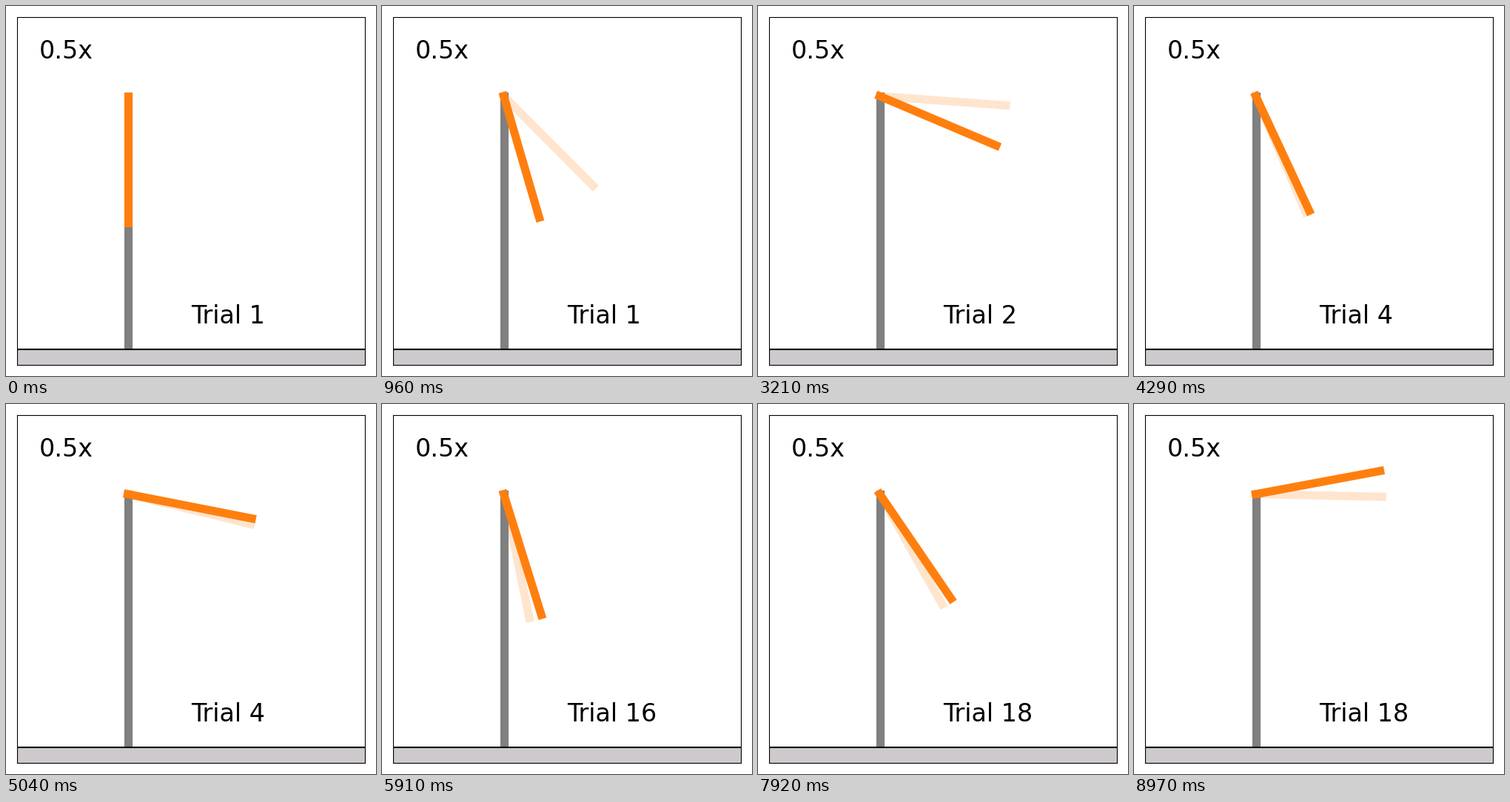
A matplotlib script for the animation above (9000 ms loop, 500 px wide and 500 px high).

```python
import matplotlib.pyplot as plt
import numpy as np
from matplotlib.animation import FuncAnimation

STEPS = 60      # frames per trial
HEIGHT = 2.0    # pivot height, in arm lengths
EASE = 2.35     # sharpness of the swing

# Trial number: (final degrees, rise time in frames) of arm and ghost
TRIALS = {
    1: ((38, 41), (95, 38.7)),
    2: ((120, 51.2), (106, 37.9)),
    4: ((97, 38.5), (97, 39.9)),
    16: ((117, 37.1), (115, 44)),
    18: ((104.4, 35.5), (92.7, 36.1)),
}
ORDER = list(TRIALS)

fig = plt.figure(figsize=(5, 5), dpi=100)
ax = fig.add_axes([0.03, 0.03, 0.94, 0.94])
ax.set(xlim=(-0.875, 1.875), ylim=(-0.125, 2.625), xticks=[], yticks=[])


def rod(color, z, alpha=1):
    return ax.plot([0, 0], [0, HEIGHT], color=color, lw=8, alpha=alpha,
                   solid_capstyle="projecting", zorder=z)[0]


ghost = rod("tab:orange", 1, 0.2)
rod("gray", 2)
arm = rod("tab:orange", 3)

# The ground hides the foot of the post but stays under the frame
ax.axhspan(-1, 0, facecolor="#cdc9cc", edgecolor="none", zorder=2.1)
ax.axhline(0, color="black", lw=1.5, zorder=2.2)

ax.text(0.0643, 0.88, "0.5x", fontsize=24, transform=ax.transAxes)
label = ax.text(0.5, 0.12, "", fontsize=24, transform=ax.transAxes)


def swing(step, final, rise):
    """Angle from hanging: slow start, then settling towards final."""
    return np.radians(final) * (1 - np.exp(-(step / rise) ** EASE))


def aim(line, angle):
    line.set_data([0, np.sin(angle)], [HEIGHT, HEIGHT - np.cos(angle)])


def update(frame):
    trial, step = divmod(frame, STEPS)
    number = ORDER[trial]
    for line, motion in zip((arm, ghost), TRIALS[number]):
        aim(line, swing(step, *motion))
    label.set_text(f"Trial {number}")
    return arm, ghost, label


anim = FuncAnimation(fig, update, frames=STEPS * len(ORDER), interval=30,
                     repeat=True, repeat_delay=0)
plt.show()
```
